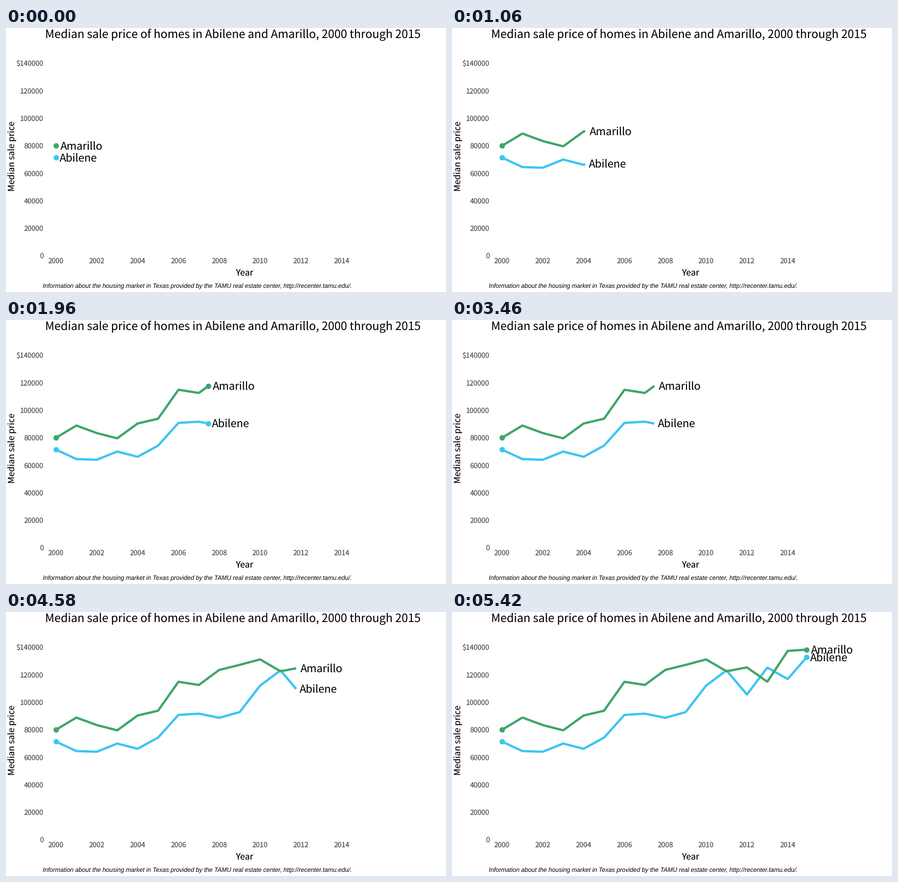
These frames come from a looping animation (968 by 579 pixels, 7620 ms). A matplotlib script:

```python
import numpy as np
import matplotlib.pyplot as plt
from matplotlib.animation import FuncAnimation

W, H, DPI = 968, 579, 64
PT = 72 / DPI                      # points per pixel
FRAME_MS, LOOP_MS = 20, 7620
STEPS_PER_YEAR = 13
MID_STEP, LAST_STEP = 97, 194      # where the lines pause
RESUME = 173                       # frame at which they move on
X0, YEAR_W = 110, 44.9
GREY = "#4d4d4d"

plt.rcParams["font.family"] = ["Noto Sans CJK JP", "DejaVu Sans"]
plt.rcParams["text.hinting"] = "none"

fig = plt.figure(figsize=(W / DPI, H / DPI), dpi=DPI, facecolor="white")
ax = fig.add_axes([0, 0, 1, 1])
ax.set_xlim(0, W)
ax.set_ylim(H, 0)
ax.axis("off")


def write(x, y, text, px, color="black", ha="left", **kw):
    """Text with its baseline at y, size in pixels."""
    return ax.text(x, y, text, fontsize=px * PT, color=color, ha=ha,
                   va="baseline", parse_math=False, **kw)


class Series:
    """One city's line, its end dots and its travelling label."""

    def __init__(self, name, color, ys, gap):
        self.ys, self.gap = np.array(ys), gap
        self.xs = X0 + YEAR_W * np.arange(len(ys))
        self.line, = ax.plot([], [], color=color, lw=5 * PT, zorder=2,
                             solid_capstyle="butt", solid_joinstyle="round")
        dot = dict(marker="o", ms=12 * PT, mew=0, color=color, ls="none", zorder=3)
        ax.plot(self.xs[:1], self.ys[:1], **dot)
        self.end, = ax.plot(self.xs[:1], self.ys[:1], **dot)
        self.label = write(0, 0, name, 23.6, zorder=4)

    def show(self, year, dotted):
        x = X0 + YEAR_W * year
        y = np.interp(x, self.xs, self.ys)
        past = self.xs < x
        self.line.set_data(np.append(self.xs[past], x), np.append(self.ys[past], y))
        self.end.set_data([x], [y])
        self.end.set_visible(dotted)
        self.label.set_position((x + self.gap, y + 9))


write(499, 22, "Median sale price of homes in Abilene and Amarillo, "
      "2000 through 2015", 25.2, ha="center")
for k in range(8):
    tick = ("$" if k == 7 else "") + str(20000 * k)
    write(82.5, 505.2 - 60.25 * k, tick, 15.4, GREY, "right")
for k in range(0, 15, 2):
    write(X0 + YEAR_W * k, 515.8, str(2000 + k), 15.4, GREY, "center")
write(525, 542.3, "Year", 19, ha="center")
write(18.5, 281.5, "Median sale price", 19, ha="center",
      rotation=90, rotation_mode="anchor")
write(81, 570.5, "Information about the housing market in Texas provided by "
      "the TAMU real estate center, http://recenter.tamu.edu/.", 13.52,
      family="Liberation Sans", style="italic")

cities = [
    Series("Abilene", "#3dc5f3",
           [284.3, 305, 306.5, 288.5, 300, 275.5, 225.7, 223,
            232, 219.5, 161.5, 128, 181, 122, 147, 95.5], 7.8),
    Series("Amarillo", "#3fa66b",
           [258.3, 231.5, 248, 259.5, 227, 216.5, 153, 160,
            127, 116, 104, 130, 121.5, 153, 85.3, 82.3], 9.5),
]


def update(n):
    if n < RESUME:
        step, stop = n, MID_STEP
    else:
        step, stop = n - RESUME + MID_STEP, LAST_STEP
    year = min(step, stop) / STEPS_PER_YEAR
    for city in cities:
        city.show(year, step > stop)
    return []


anim = FuncAnimation(fig, update, frames=LOOP_MS // FRAME_MS, interval=FRAME_MS,
                     init_func=lambda: update(0), repeat=True, repeat_delay=0)
plt.show()
```
